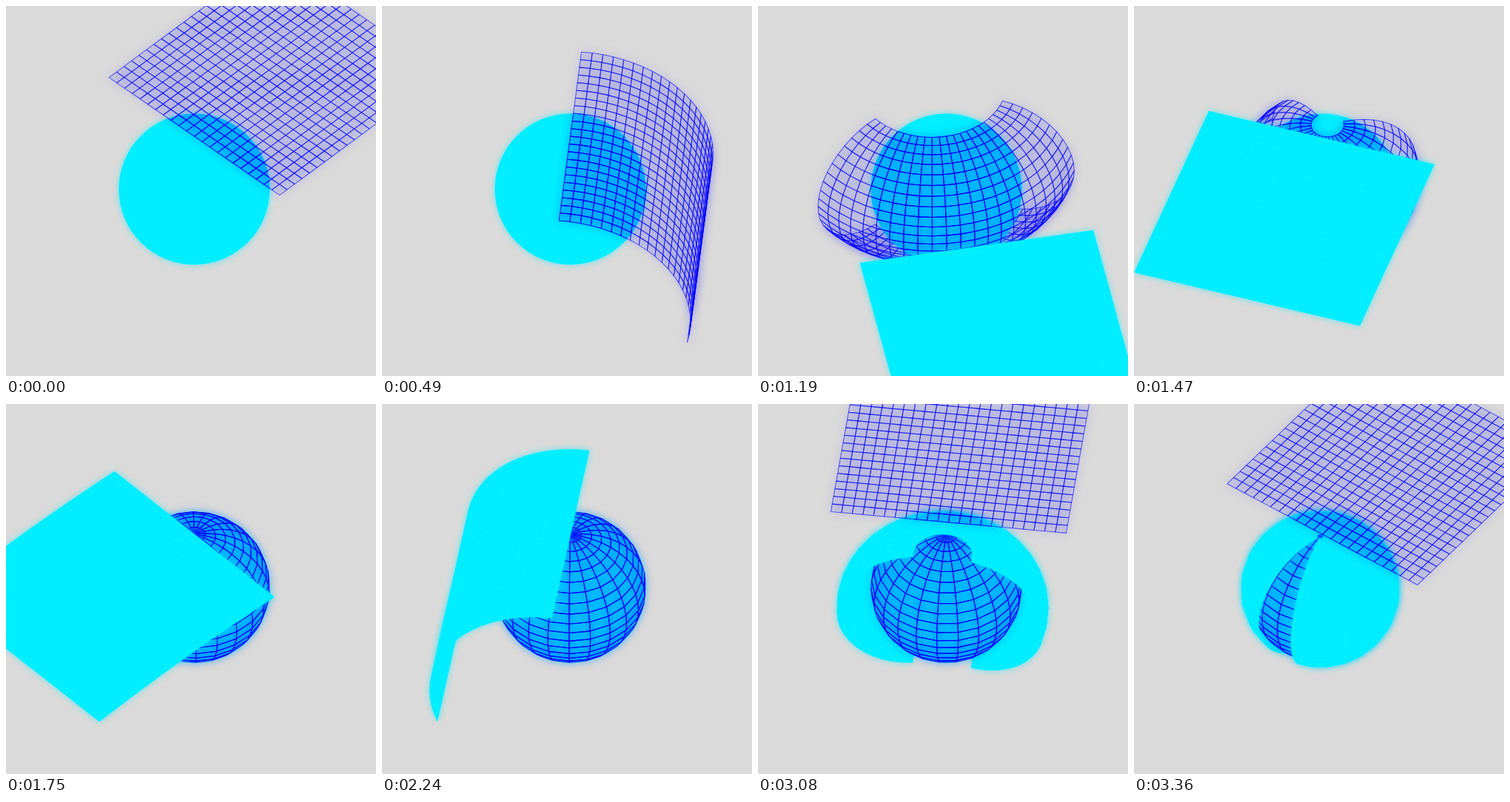
An HTML page with a canvas for the animation above (3.43 s loop, 500 px wide and 500 px high).

```html
<!DOCTYPE html>
<html>
<head>
<meta charset="utf-8">
<style>
  html, body { margin: 0; width: 100%; height: 100%; overflow: hidden; background: #dadada; }
  canvas { display: block; width: 100vmin; height: 100vmin; }
</style>
</head>
<body>
<canvas id="stage" width="500" height="500"></canvas>
<script>
const LOOP = 3430, HALF = LOOP / 2, STEP = 70;
const SIZE = 500, CELLS = 22;
const R = 102, SIDE = Math.PI * R;
const CX = 254.5, CY = 247.5;
const TILT = 45.6 * Math.PI / 180;
const SIN = Math.sin(TILT), COS = Math.cos(TILT);
const BG = '#dadada', CYAN = '#00eeff';
const CYAN_HAZE = 'rgba(0,238,255,0.6)';
const MESH_LINE = 'rgba(0,0,250,0.62)', MESH_FILL = 'rgba(0,0,255,0.05)', MESH_HAZE = 'rgba(0,0,255,0.5)';

const ctx = document.getElementById('stage').getContext('2d');
const layer = document.createElement('canvas');
layer.width = layer.height = SIZE;
const pen = layer.getContext('2d');

const clamp = x => Math.max(0, Math.min(1, x));
const mix = (a, b, k) => a + (b - a) * k;
const softStart = x => x * (1 - 0.35 * (1 - x) ** 2);

// Sheet pose by phase: slide in flat, curl pole to pole, then close around the axis.
function surface(phase, heading) {
  const curl = Math.max(1e-4, Math.PI * clamp(phase / (HALF / 2)));
  const close = softStart(clamp((phase - HALF / 2) / (HALF / 2)));
  const wrap = Math.max(1e-4, 2 * Math.PI * close);
  const slide = phase < 0 ? 213 * Math.pow(-phase / 525, 5.5) : 0;
  const c = Math.cos(heading), s = Math.sin(heading);

  return (u, v) => {
    const a = curl * v;
    const bend = mix(SIDE, 2 * Math.PI * R * Math.sin(a), close) / wrap;
    const side = bend * Math.sin(wrap * u);
    const out = slide + SIDE * Math.sin(a) / curl - bend * (1 - Math.cos(wrap * u));
    const z = R - SIDE * (1 - Math.cos(a)) / curl;
    const x = out * c - side * s;
    const y = out * s + side * c;
    return { x: CX + x, y: CY + y * SIN - z * COS, depth: y * COS + z * SIN };
  };
}

function cellsOf(phase, heading) {
  const at = surface(phase, heading);
  const grid = [];
  for (let j = 0; j <= CELLS; j++) {
    grid.push([]);
    for (let i = 0; i <= CELLS; i++) grid[j].push(at(i / CELLS - 0.5, j / CELLS));
  }
  const cells = [];
  for (let j = 0; j < CELLS; j++) {
    for (let i = 0; i < CELLS; i++) {
      const quad = [grid[j][i], grid[j][i + 1], grid[j + 1][i + 1], grid[j + 1][i]];
      quad.front = quad.reduce((sum, p) => sum + p.depth, 0) > 0;
      cells.push(quad);
    }
  }
  return cells;
}

function disk() {
  ctx.beginPath();
  ctx.arc(CX, CY, R, 0, 2 * Math.PI);
}

function glow(color, blur, paint) {
  ctx.save();
  ctx.shadowColor = color;
  ctx.shadowBlur = blur;
  paint();
  ctx.restore();
}

function drawCells(cells, wire) {
  if (!cells.length) return;
  pen.clearRect(0, 0, SIZE, SIZE);
  pen.lineJoin = 'round';
  pen.fillStyle = wire ? MESH_FILL : CYAN;
  pen.strokeStyle = wire ? MESH_LINE : CYAN;
  pen.lineWidth = wire ? 1.05 : 0.9;
  for (const quad of cells) {
    pen.beginPath();
    quad.forEach(p => pen.lineTo(p.x, p.y));
    pen.closePath();
    pen.fill();
    pen.stroke();
  }
  const stamp = () => ctx.drawImage(layer, 0, 0);
  if (!wire) return glow(CYAN_HAZE, 9, stamp);
  glow(MESH_HAZE, 12, stamp);
  // The tint is stronger where the mesh lies over the ball.
  ctx.save();
  disk();
  ctx.clip();
  glow(MESH_HAZE, 12, stamp);
  ctx.restore();
}

function render(t) {
  const heading = (t / LOOP * 360 - 46) * Math.PI / 180;
  const meshActive = t < HALF;
  const phase = t % HALF;
  const cells = cellsOf(phase, heading);

  ctx.fillStyle = BG;
  ctx.fillRect(0, 0, SIZE, SIZE);

  drawCells(cells.filter(q => !q.front), meshActive);

  glow(CYAN_HAZE, 9, () => {
    ctx.fillStyle = CYAN;
    disk();
    ctx.fill();
  });
  if (!meshActive) drawCells(cellsOf(HALF, heading).filter(q => q.front), true);

  drawCells(cells.filter(q => q.front), meshActive);

  // The next sheet arrives half a turn later, from the opposite side.
  const next = phase - HALF;
  if (next > -680) drawCells(cellsOf(next, heading), !meshActive);
}

const start = performance.now();
function tick(now) {
  const t = Math.max(0, now - start) % LOOP;
  render(Math.floor((t + 0.5) / STEP) * STEP % LOOP);
  requestAnimationFrame(tick);
}
render(0);
requestAnimationFrame(tick);
</script>
</body>
</html>
```
